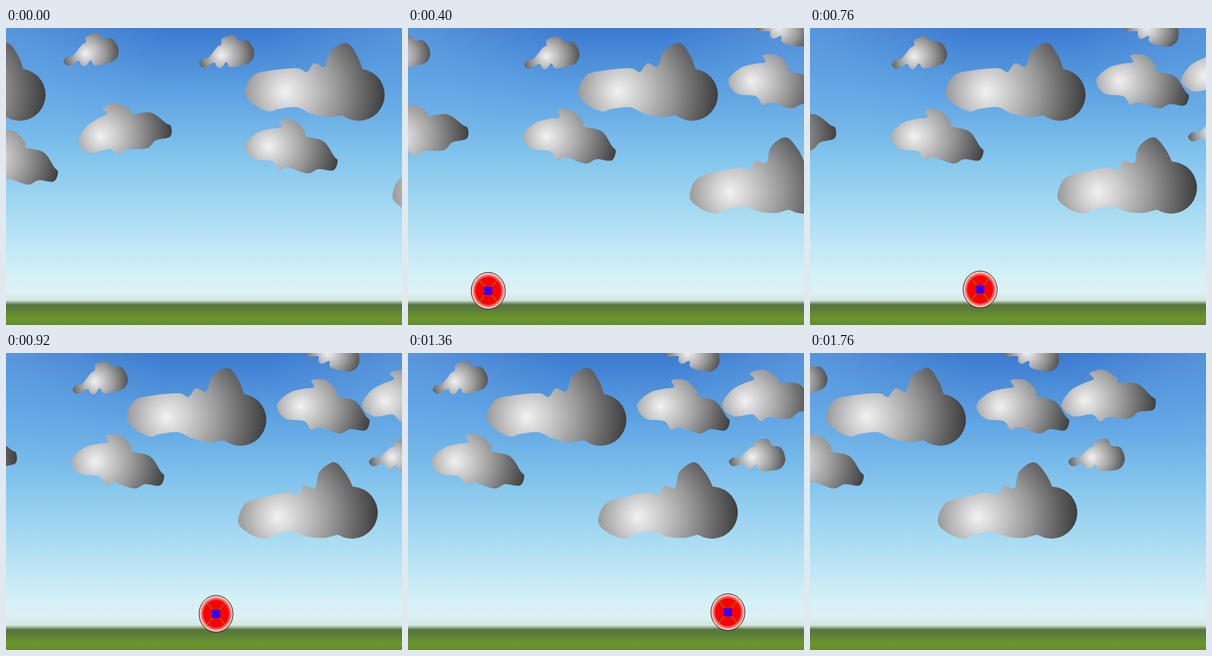
Write an HTML page that moves like this. It is 640 by 480 pixels and loops after 1800 ms.

```html
<!DOCTYPE html>
<html lang="en">
<head>
<meta charset="utf-8">
<title>Ball and clouds</title>
<style>
  html, body { margin: 0; width: 100%; height: 100%; overflow: hidden; }
  body {
    background:
      radial-gradient(260px 190px at 0 0, rgba(150,210,245,.32), rgba(150,210,245,0)),
      radial-gradient(220px 150px at 640px 0, rgba(150,210,245,.28), rgba(150,210,245,0)),
      linear-gradient(#3b79cf, #5a9fe2 95px, #80c2ec 200px, #a8dbf3 300px, #d3f0f7 395px,
        #dcf1f4 427px, #d5e6e2 440px, #58763f 447px, #56783a 451px, #6d962e 470px, #668a2b 480px);
  }
  svg { position: absolute; left: 0; top: 0; display: block; }
</style>
</head>
<body>
<svg width="640" height="480" viewBox="0 0 640 480">
  <defs>
    <radialGradient id="skin">
      <stop offset=".72" stop-color="#f00"/>
      <stop offset="1" stop-color="#fff"/>
    </radialGradient>
  </defs>
  <g id="sky"></g>
  <g id="ball">
    <ellipse rx="27.5" ry="29.7" fill="url(#skin)" stroke="#000"/>
    <path d="M-18-22L18 22M18-22L-18 22" stroke="#4c0"/>
    <rect x="-6.5" y="-6.5" width="13" height="13" fill="#2c00ff"/>
  </g>
</svg>
<script>
const $ = id => document.getElementById(id);

function add(parent, tag, attrs) {
  const el = document.createElementNS('http://www.w3.org/2000/svg', tag);
  for (const k in attrs) el.setAttribute(k, attrs[k]);
  return parent.appendChild(el);
}

// Closed smooth curve through a few key points
function smooth(text) {
  const p = text.trim().split(/\s+/).map(s => s.split(',').map(Number));
  const at = i => p[(i + p.length) % p.length];
  const handle = (i, side) => [0, 1].map(k => at(i)[k] + side * (at(i + 1)[k] - at(i - 1)[k]) / 6);
  return 'M' + p[0] + p.map((_, i) => `C${handle(i, 1)} ${handle(i + 1, -1)} ${at(i + 1)}`).join('') + 'Z';
}

// Each cloud is lit from a highlight towards the left and fades to dark grey
function shape(id, pivot, [fx, fy], r, outline, disc) {
  const defs = document.querySelector('defs');
  const grad = add(defs, 'radialGradient', {
    id: id + 'Light', gradientUnits: 'userSpaceOnUse', fx, fy, cx: fx + r * .14, cy: fy, r
  });
  ['#f2f2f2', '#c6c6c6', '#989898', '#646464', '#323232'].forEach((color, i, all) =>
    add(grad, 'stop', { offset: i / (all.length - 1), 'stop-color': color }));
  const g = add(defs, 'g', {
    id, fill: `url(#${id}Light)`, transform: `translate(${-pivot[0]} ${-pivot[1]})`
  });
  add(g, 'path', { d: smooth(outline) });
  if (disc) add(g, 'circle', { cx: pivot[0], cy: pivot[1], r: disc });
}

shape('big', [184, 84], [64, 79], 151,
  `0,80 13,53 40,45 84,41 100,47 112,33 129,38 139,13 164,0 180,18 190,43 200,85
   180,120 159,117 134,120 106,114 84,104 54,107 38,111 14,99`, 42);
shape('slope', [75, 44], [37, 44], 110,
  `0,43 19,23 42,16 60,13 56,2 79,2 97,20 98,28 127,36 144,60 150,68 143,83
   119,81 101,88 69,78 55,82 44,68 14,64`);
shape('small', [45, 27], [35, 33], 57,
  `0,47 5,39 15,37 29,20 36,15 37,6 55,0 64,9 79,10 89,27 84,43 67,50 50,52
   44,44 36,53 29,52 24,45 9,53`);

// Clouds share one drift; before the cut each one sits dx, dy away
const clouds = [];
function cloud(id, x, y, turn = 0, dx = 0, dy = 0) {
  const el = add($('sky'), 'use', { href: '#' + id });
  clouds.push((drift, early) => place(el, drift + x + early * dx, y + early * dy, turn));
}

const place = (el, x, y, turn = 0) =>
  el.setAttribute('transform', `translate(${x} ${y}) rotate(${turn})`);

cloud('big', -364, 108);
cloud('slope', -377, 209);
cloud('small', -283, 38, 0, 35, -3);
cloud('slope', -257, 165, -20, 59, -3);
cloud('small', -42, 40, 0, 13, -2);
cloud('big', 184, 108);
cloud('slope', -14, 175, 0, 89, 16);
cloud('big', 364, 258, -6, 58);
cloud('small', 336, -2, 26);
cloud('slope', 318, 86, 0, 50, 8);
cloud('slope', 454, 69, -13, 50, 6);
cloud('small', 439.5, 164, 10, 50);

const STEP = 40, COUNT = 45, CUT = 10, HURRY = 39;

function driftAt(n) {
  if (n < CUT) return 386 - 21.6 * n;
  return 96.2 + 6.16 * Math.max(0, HURRY - n) - 14.04 * Math.max(0, n - HURRY);
}

const start = performance.now();

function draw(now) {
  const n = Math.floor(Math.max(0, now - start) / STEP) % COUNT;
  for (const move of clouds) move(driftAt(n), n < CUT);
  place($('ball'), -31.7 + 16.14 * n, 427.3 - .25 * n);
  requestAnimationFrame(draw);
}
draw(start);
</script>
</body>
</html>
```
